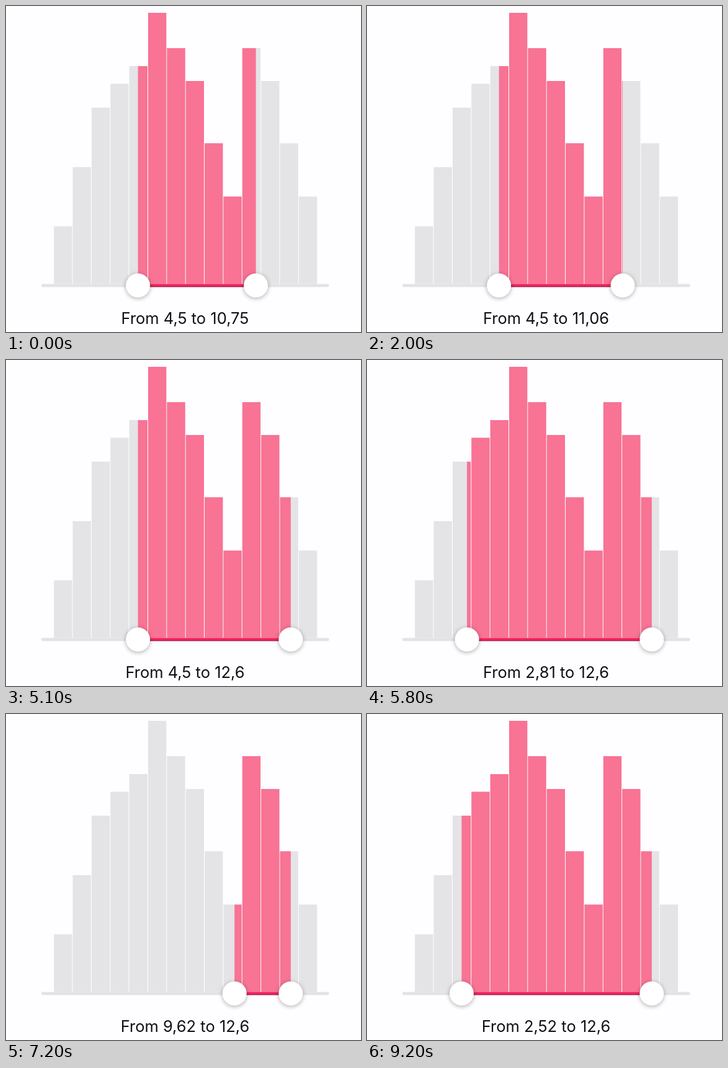
Animation, 572 px wide and 526 px high, one loop 9300 ms. Source, as an HTML page with a canvas:

```html
<!DOCTYPE html>
<html lang="en">
<head>
<meta charset="utf-8">
<title>Range slider with histogram</title>
<style>
  html, body { margin: 0; width: 100%; height: 100%; overflow: hidden; background: #fefdff; }
  canvas { display: block; width: 572px; height: 526px; }
</style>
</head>
<body>
<canvas id="stage"></canvas>
<script>
const WIDTH = 572, HEIGHT = 526;
const LOOP = 9300, STEP = 100;
const ORIGIN = 75.8, UNIT = 30.4;
const BASE = 448.5, RAIL_Y = 451;
const GREY = '#e4e4e6', PINK = '#f87394';

// The histogram climbs once, then the same descent appears twice.
const CLIMB = [93, 188.5, 284.5, 323, 351.5, 437.5];
const DESCENT = [380.5, 327.5, 227, 141];
const HEIGHTS = [...CLIMB, ...DESCENT, ...DESCENT];

// Key points of each drag: time in ms and slider value.
const key = (time, value) => ({ time, value });
const LOWER = [
  key(5100, 4.5), key(5450, 11.9), key(5950, 0.3), key(6400, 2.1), key(7050, 11.9),
  key(7500, 3.1), key(7900, 9.66), key(8050, 11.8), key(8700, 1.25), key(9000, 2.52)
];
const UPPER = [
  key(0, 10.75), key(1000, 12.03), key(1400, 13.58), key(2000, 11.06),
  key(3200, 4.9), key(3800, 4.9), key(4800, 12.6)
];

const canvas = document.getElementById('stage');
const ctx = canvas.getContext('2d');
const ratio = window.devicePixelRatio || 1;
canvas.width = WIDTH * ratio;
canvas.height = HEIGHT * ratio;
ctx.scale(ratio, ratio);

const toX = value => ORIGIN + UNIT * value;
const format = value => String(+value.toFixed(2)).replace('.', ',');

// Harmonic mean of neighbouring slopes, zero at turning points.
function tangent(path, i) {
  if (i === 0 || i === path.length - 1) return 0;
  const slope = (a, b) => (b.value - a.value) / (b.time - a.time);
  const before = slope(path[i - 1], path[i]), after = slope(path[i], path[i + 1]);
  return before * after > 0 ? 2 * before * after / (before + after) : 0;
}

function valueAt(path, time) {
  const next = path.findIndex(point => time < point.time);
  if (next === 0) return path[0].value;
  if (next < 0) return path[path.length - 1].value;
  const from = path[next - 1], to = path[next];
  const span = to.time - from.time, u = (time - from.time) / span, w = 1 - u;
  return w * w * (1 + 2 * u) * from.value + u * u * (1 + 2 * w) * to.value
    + span * u * w * (w * tangent(path, next - 1) - u * tangent(path, next));
}

function drawBars(color) {
  ctx.fillStyle = color;
  HEIGHTS.forEach((height, i) => ctx.fillRect(77.2 + 30.36 * i, BASE - height, 29.3, height));
}

function drawRail() {
  ctx.fillStyle = '#e3e3e5';
  ctx.beginPath();
  ctx.roundRect(57, BASE, 463.5, 5, 2);
  ctx.fill();
}

function drawSelection(left, right) {
  ctx.save();
  ctx.beginPath();
  ctx.rect(left, 0, right - left, HEIGHT);
  ctx.clip();
  drawBars(PINK);
  ctx.fillStyle = '#f4215f';
  ctx.fillRect(left, BASE, right - left, 3.5);
  ctx.fillStyle = '#b01f4c';
  ctx.fillRect(left, BASE + 3.5, right - left, 1.5);
  ctx.restore();
}

function drawHandle(x) {
  ctx.save();
  ctx.shadowColor = 'rgba(0, 0, 0, 0.32)';
  ctx.shadowBlur = 7 * ratio;
  ctx.shadowOffsetY = 1.5 * ratio;
  ctx.fillStyle = '#fff';
  ctx.beginPath();
  ctx.arc(x, RAIL_Y, 19.5, 0, Math.PI * 2);
  ctx.fill();
  ctx.restore();
}

function drawLabel(lower, upper) {
  ctx.font = '25.5px Inter, sans-serif';
  ctx.textAlign = 'center';
  ctx.fillStyle = '#111';
  ctx.fillText(`From ${format(lower)} to ${format(upper)}`, 288.5, 513);
}

function draw(now) {
  const time = Math.floor(now % LOOP / STEP) * STEP;
  const lower = valueAt(LOWER, time), upper = valueAt(UPPER, time);
  const left = toX(lower), right = toX(upper);
  ctx.fillStyle = '#fefdff';
  ctx.fillRect(0, 0, WIDTH, HEIGHT);
  drawBars(GREY);
  drawRail();
  drawSelection(left, right);
  drawHandle(left);
  drawHandle(right);
  drawLabel(lower, upper);
  requestAnimationFrame(draw);
}
requestAnimationFrame(draw);
</script>
</body>
</html>
```
